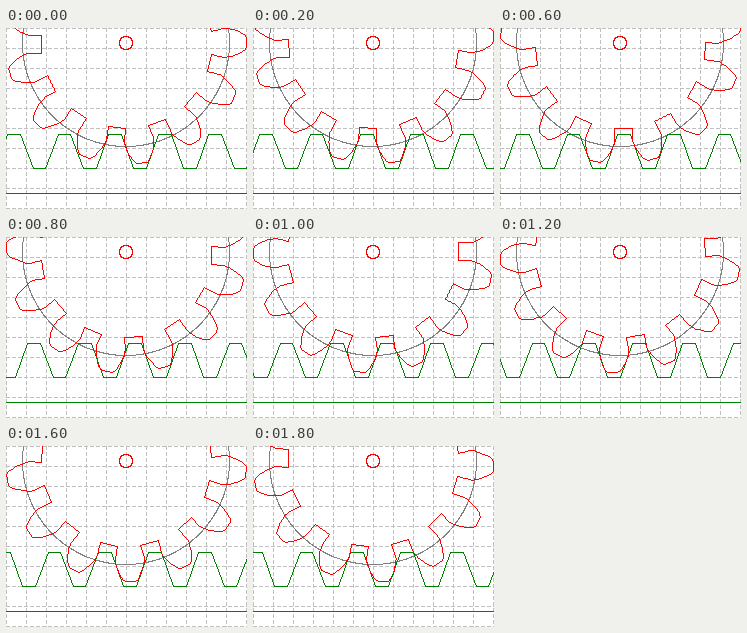
A matplotlib script that plays this animation: 241x181 px, repeating every 2 s.

```python
import numpy as np
import matplotlib.pyplot as plt
from matplotlib.animation import FuncAnimation

W, H, DPI = 241, 181, 100
FRAMES, INTERVAL = 10, 200
CX, CY = 120, 15
MODULE, TEETH = 16, 13
R = MODULE * TEETH / 2
PITCH = np.pi * MODULE
STEP = 2 * np.pi / TEETH
PRESSURE = np.radians(20)
R_BASE, R_ROOT, R_TIP = R * np.cos(PRESSURE), 85.5, 120.5
SHIFT = 4           # profile shift of the gear
RACK_HALF = 17      # half the rack's tooth height
START = -11.7       # first rack tooth relative to the gear axis
DASH, PERIOD = 4, 6

SILVER, GRAY = (192, 192, 192), (128, 128, 128)
RED, GREEN = (255, 0, 0), (0, 128, 0)


def inv(a):
    return np.tan(a) - a


def gear_outline():
    """Radius and angle along the closed outline; angle 0 is mid-tooth."""
    half = (PITCH / 2 + 2 * SHIFT * np.tan(PRESSURE)) / (2 * R)
    r = np.linspace(R_BASE, R_TIP - 2, 9)
    flank = half + inv(PRESSURE) - inv(np.arccos(R_BASE / r))
    radius = np.concatenate([[R_ROOT], r, [R_TIP]])
    angle = np.concatenate([[0.137], flank, [flank[-1] - 0.022]])
    radius = np.concatenate([radius, radius[::-1]])
    angle = np.concatenate([-angle, angle[::-1]])
    turns = np.arange(TEETH)[:, None] * STEP
    radius = np.tile(radius, TEETH)
    angle = (angle + turns).ravel()
    return np.append(radius, radius[0]), np.append(angle, angle[0] + 2 * np.pi)


def rack_outline():
    mid = CY + R + SHIFT
    top = PITCH / 4 - RACK_HALF * np.tan(PRESSURE)
    foot = PITCH / 4 + RACK_HALF * np.tan(PRESSURE)
    x = np.array([-foot, -top, top, foot])
    y = mid + RACK_HALF * np.array([1, -1, -1, 1])
    starts = np.arange(-4, 5)[:, None] * PITCH
    return (x + starts).ravel(), np.tile(y, len(starts))


def stroke(canvas, x, y, color):
    """Draw a hard-edged polyline, one pixel wide."""
    x, y = np.rint(x), np.rint(y)
    for x0, y0, x1, y1 in zip(x[:-1], y[:-1], x[1:], y[1:]):
        n = int(max(abs(x1 - x0), abs(y1 - y0))) + 1
        px = np.rint(np.linspace(x0, x1, n)).astype(int)
        py = np.rint(np.linspace(y0, y1, n)).astype(int)
        seen = (px >= 0) & (px < W) & (py >= 0) & (py < H)
        canvas[py[seen], px[seen]] = color


def circle(canvas, radius, color):
    t = np.linspace(0, 2 * np.pi, 1500)
    stroke(canvas, CX - 0.5 + radius * np.cos(t),
           CY - 0.5 + radius * np.sin(t), color)


def background():
    canvas = np.full((H, W, 3), 255, np.uint8)
    canvas[np.arange(H) % PERIOD < DASH, ::20] = SILVER
    canvas[::20, np.arange(W) % PERIOD < DASH] = SILVER
    canvas[165] = GREEN
    circle(canvas, R - 0.5, GRAY)
    circle(canvas, 6.5, RED)
    return canvas


base = background()
gear_r, gear_a = gear_outline()
rack_x, rack_y = rack_outline()

fig = plt.figure(figsize=(W / DPI, H / DPI), dpi=DPI)
ax = fig.add_axes([0, 0, 1, 1])
ax.axis("off")
stage = ax.imshow(base, interpolation="nearest", aspect="auto")


def draw(i):
    travel = START + PITCH * i / FRAMES
    angle = gear_a + travel / R + STEP / 2
    canvas = base.copy()
    stroke(canvas, CX + travel + rack_x, rack_y, GREEN)
    stroke(canvas, CX + gear_r * np.sin(angle),
           CY + gear_r * np.cos(angle), RED)
    stage.set_data(canvas)
    return (stage,)


anim = FuncAnimation(fig, draw, frames=FRAMES, interval=INTERVAL,
                     repeat=True, repeat_delay=0, blit=False)
plt.show()
```
